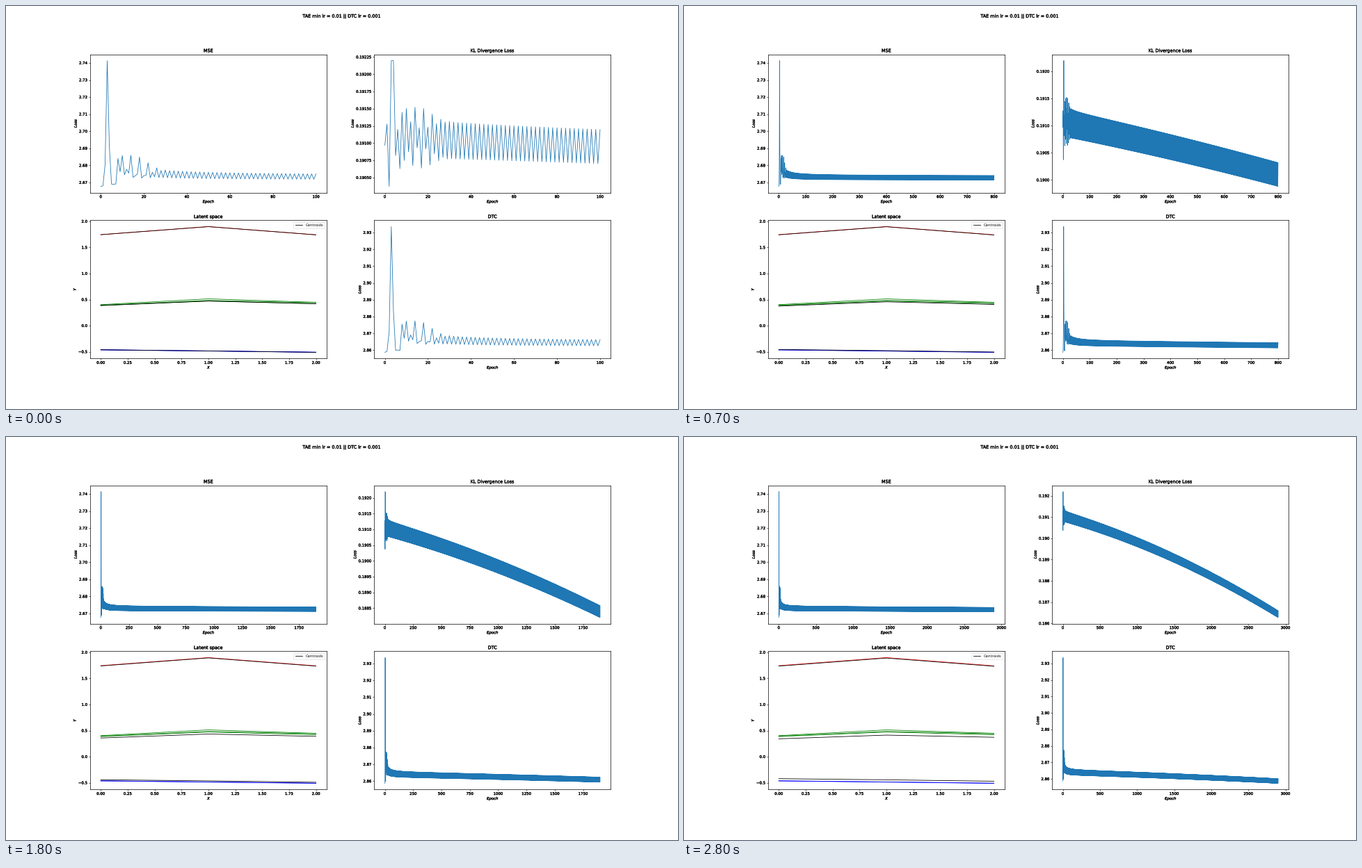
These frames come from a looping animation (966x580 px, 2.9 s). A matplotlib script:

```python
import numpy as np
import matplotlib.pyplot as plt
from matplotlib import patheffects
from matplotlib.animation import FuncAnimation

DPI = 38.64
STEP = 100          # epochs added per frame
FRAMES = 29
LAST = STEP * FRAMES

plt.rcParams.update({
    "font.family": "DejaVu Sans",
    "font.size": 10,
    "text.hinting": "none",
    "axes.linewidth": 1.3,
    "xtick.major.width": 1.1,
    "ytick.major.width": 1.1,
    "axes.formatter.useoffset": False,
    "path.simplify": False,
})

HEAVY = [patheffects.withStroke(linewidth=0.6, foreground="black")]

epochs = np.arange(LAST + 1)
inv = 1 / np.maximum(epochs, 1)
beat = np.exp(-((epochs - 16.5) / 7) ** 2)
phase = np.pi * epochs / 2


def oscillate(low, high, swing, skew):
    """High on even epochs, low on odd ones, with a fading four-epoch beat."""
    base = np.where(epochs % 2 == 0, high, low)
    return base + swing * beat * (skew * np.sin(phase) - np.cos(phase))


# Both losses jump around epoch 3 and oscillate from epoch 8 on.
settled = epochs >= 8

spike = 2.66774 + 0.0002 * epochs + 0.0741 * np.exp(-((epochs - 3.1) / 0.82) ** 2)
mse = np.where(settled,
               oscillate(2.6715 - 1.6e-7 * epochs + 0.04 * inv,
                         2.6742 - 2.4e-7 * epochs + 0.09 * inv,
                         swing=0.006, skew=0.2),
               spike)

kl_low = 0.190805 - 1e-6 * epochs - 1.93e-10 * epochs ** 2
kl_gap = 0.000485 - 6e-8 * epochs + 0.0016 * inv
kl = oscillate(kl_low, kl_low + kl_gap, swing=0.00015, skew=-1)
kl[~settled] = [.19097, .191277, .190373, .192198, .192198, .19082, .1912, .19063]

RED = np.array([1.745, 1.8995, 1.742])
GREEN = np.array([0.388, 0.474, 0.422])
BLUE = np.array([-0.463, -0.485, -0.509])

SAMPLES = [
    ("r", RED),
    ("g", GREEN + [0.016, 0.040, 0.026]),
    ("g", GREEN + [0.004, 0.010, 0.018]),
    ("g", GREEN - 0.001),
    ("b", BLUE + 0.0015),
    ("b", BLUE - 0.0015),
]


def centroids(epoch):
    t = epoch / 1000
    return (RED - 0.003 * t,
            GREEN - np.array([0.0155, 0.0207, 0.017]) * t,
            BLUE - [0, 0, 0.003] + 0.0061 * t + 0.0029 * t * t)


fig, ((ax_mse, ax_kl), (ax_latent, ax_dtc)) = plt.subplots(
    2, 2, figsize=(966.01 / DPI, 580.01 / DPI), dpi=DPI, facecolor="white")
fig.subplots_adjust(left=0.125, right=0.9, bottom=0.125, top=0.88,
                    wspace=0.2, hspace=0.2)
fig.suptitle("TAE min lr = 0.01 || DTC lr = 0.001", y=0.9793, fontsize=12,
             path_effects=HEAVY)


def label(ax, title, xlabel, ylabel):
    ax.set_title(title, fontsize=12, path_effects=HEAVY)
    ax.set_xlabel(xlabel, style="italic", path_effects=HEAVY)
    ax.set_ylabel(ylabel, style="italic", path_effects=HEAVY)


label(ax_mse, "MSE", "Epoch", "Loss")
label(ax_kl, "KL Divergence Loss", "Epoch", "Loss")
label(ax_latent, "Latent space", "X", "Y")
label(ax_dtc, "DTC", "Epoch", "Loss")

curves = [(ax.plot([], [], color="#1f77b4", lw=1.5)[0], data)
          for ax, data in ((ax_mse, mse), (ax_kl, kl), (ax_dtc, mse + kl))]

for color, row in SAMPLES:
    ax_latent.plot(range(3), row, color=color, lw=1.5)
centers = [ax_latent.plot(range(3), row, color="black", lw=1.5)[0]
           for row in centroids(STEP)]
ax_latent.legend(centers[:1], ["Centroids"], loc="upper right")


def update(frame):
    count = STEP * (frame + 1)
    for line, data in curves:
        line.set_data(epochs[:count + 1], data[:count + 1])
    for line, row in zip(centers, centroids(count)):
        line.set_ydata(row)
    for ax in fig.axes:
        ax.relim()
        ax.autoscale_view()
        for text in ax.get_xticklabels() + ax.get_yticklabels():
            text.set_path_effects(HEAVY)
    return []


anim = FuncAnimation(fig, update, frames=FRAMES, interval=100,
                     init_func=lambda: update(0), blit=False, repeat=True)
plt.show()
```
